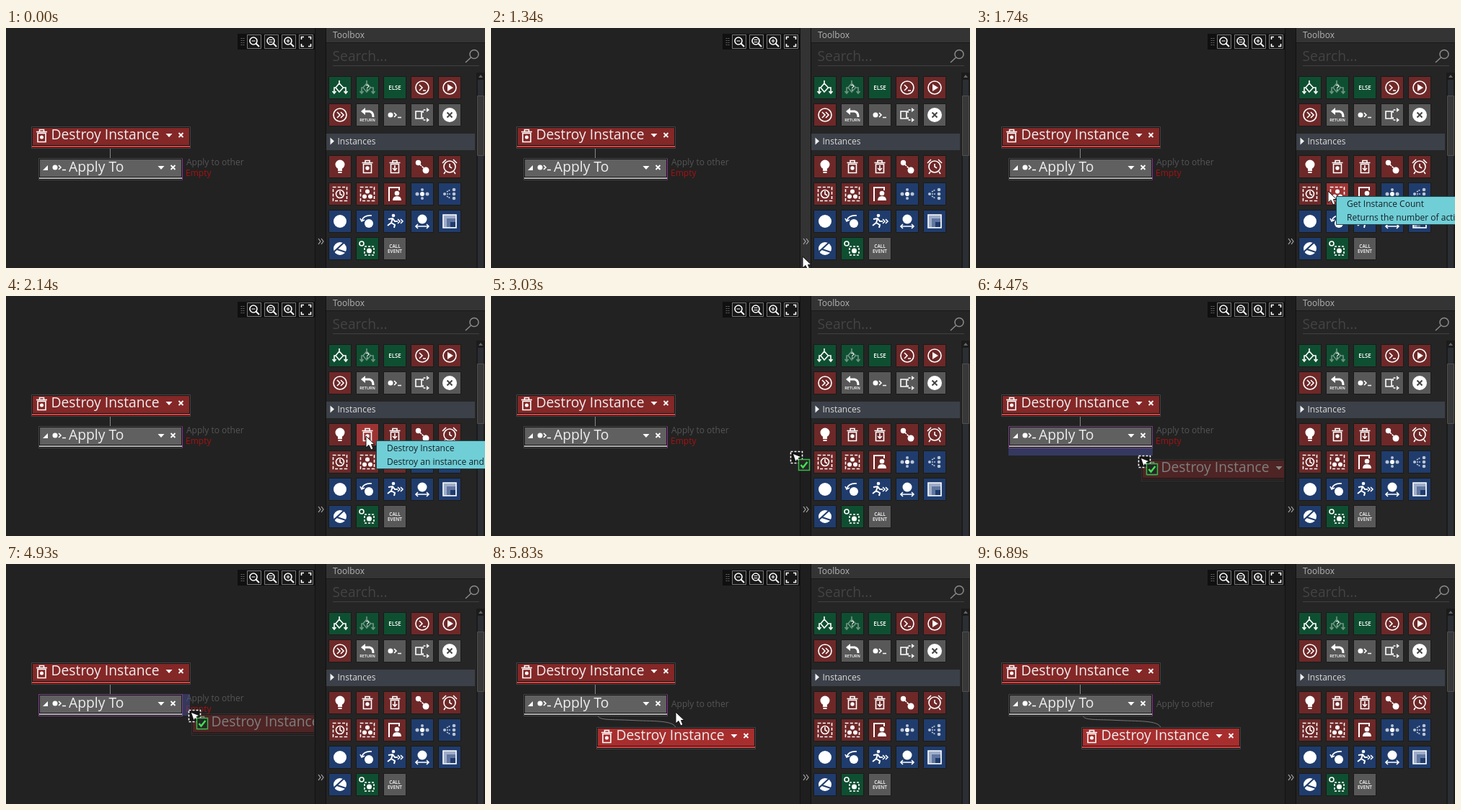
These frames come from a looping animation (664 by 334 pixels, 8.54 s). An HTML page:

```html
<!DOCTYPE html>
<html lang="en">
<head>
<meta charset="utf-8">
<title>Dragging an action onto a block</title>
<style>
html, body { margin: 0; width: 100%; height: 100%; overflow: hidden; background: #222; }
svg { display: block; width: 664px; height: 334px; }
text { font: 12px "Open Sans", "Noto Sans", sans-serif; stroke: none; }
.big { font-size: 19.3px; }
.line { fill: none; stroke: #fff; stroke-width: 1.6; }
.solid { fill: #fff; stroke: none; }
.tiny { fill: #fff; font-weight: 600; text-anchor: middle; }
</style>
</head>
<body>
<svg viewBox="0 0 664 334">
  <defs>
    <clipPath id="canvasArea"><path d="M0 0H427V334H0Z"/></clipPath>
    <g id="trash" class="line">
      <path d="M-7.500-5.500H7.500M-3-6V-8.500H3V-6M-5.500-3.500V8.500H5.500V-3.500Z"/>
    </g>
    <g id="prompt" class="line">
      <circle class="solid" cx="-6" r="3.500"/><path d="M-1-3L2 0L-1 3M4 3.500H9"/>
    </g>
    <g id="menu">
      <path d="M-21-2H-12L-16.500 3Z" fill="#fff"/>
      <path d="M-3-3L3 3M3-3L-3 3" fill="none" stroke="#fff" stroke-width="1.800"/>
    </g>
    <g id="destroy">
      <path d="M.5.5H220.500V30.500H.5Z" fill="#161616" stroke="#444"/>
      <path d="M2 2H219V26H2Z" fill="currentColor"/>
      <path d="M1 28H220" stroke="var(--rule, #dc4040)" stroke-width="2"/>
      <use href="#trash" x="14.500" y="13"/><circle cx="14.500" cy="15" r="2.500" fill="#fff"/>
      <text class="big" x="27.500" y="18" fill="#eee">Destroy Instance</text>
      <use href="#menu" x="207.500" y="12"/>
    </g>
    <g id="lens" class="line">
      <path d="M-9.500-9.500H9.500V9.500H-9.500Z" style="fill:#181818;stroke:#777;stroke-width:1"/>
      <circle cx="-1" cy="-1" r="5"/><path d="M2.500 2.500L7 7" stroke-width="2"/>
    </g>
  </defs>

  <path d="M0 0H664V334H0Z" fill="#222"/>

  <!-- Zoom bar -->
  <path d="M321 8H428V30H321Z" fill="#101010"/>
  <path d="M326.500 14V25M329.500 14V25" stroke="#666" stroke-width="2" stroke-dasharray="1 2"/>
  <use href="#lens" x="344" y="19"/><use href="#lens" x="368" y="19"/><use href="#lens" x="392" y="19"/>
  <path class="line" style="stroke-width:1.200" d="M340.500 18H345.500M364.500 16.500H369.500M364.500 19.500H369.500M388.500 18H393.500M391 15.500V20.500"/>
  <path d="M406.500 9.500H425.500V28.500H406.500Z" fill="#181818" stroke="#777"/>
  <path class="line" d="M409.500 16V12.500H413M419 12.500H422.500V16M422.500 22V25.500H419M413 25.500H409.500V22"/>

  <!-- Blocks -->
  <path d="M144.500 168V181" stroke="#888"/>
  <use href="#destroy" x="35" y="137" color="#842727"/>
  <path id="wire" d="M148 211C150 218 168 216 195 217.500S254 217 256 228" fill="none" stroke="#777"/>
  <g transform="translate(45 181)">
    <path d="M.5.5H199.500V30.500H.5Z" fill="#161616" stroke="#444"/>
    <path d="M2 2H198V26H2Z" fill="#606060"/>
    <path d="M1 28H199" stroke="#b0b0b0" stroke-width="2"/>
    <path d="M199.500 1V30" stroke="#93309a"/>
    <path id="outline" d="M.5.5H199.500V30.500H.5Z" fill="none" stroke="#7a4288"/>
    <path d="M6 17H13V10Z" fill="#fff"/>
    <use href="#prompt" x="29" y="13"/>
    <text class="big" x="42" y="19" fill="#eee">Apply To</text>
    <use href="#menu" x="186.500" y="13"/>
  </g>
  <text id="note" x="250" fill="#555">Apply to other</text>
  <text id="empty" x="249" y="206" fill="#a51212">Empty</text>
  <path id="below" d="M45 212H245V222H45Z" fill="#35395f"/>
  <path id="beside" d="M245 181H255V211H245Z" fill="#484e90" opacity=".5"/>
  <use id="dropped" href="#destroy" x="146" y="227" color="#a82e2e"/>
  <g clip-path="url(#canvasArea)"><use id="ghost" href="#destroy" color="#842727" style="--rule:#4a2626"/></g>

  <!-- Toolbox -->
  <path d="M429 0H444V334H429Z" fill="#1e1e1e"/>
  <path id="splitter" d="M429 0H443V334H429Z" fill="#333"/>
  <path d="M428.500 0V334M443.500 0V334" stroke="#111"/>
  <path d="M433 293L436 297L433 301M437 293L440 297L437 301" fill="none" stroke="#aaa" stroke-width="1.200"/>
  <path d="M444 0H664V334H444Z" fill="#252525"/>
  <path d="M444 0H664V20H444Z" fill="#343434"/><path d="M444 20.500H664" stroke="#181818"/>
  <text x="453" y="13.500" fill="#b4b4b4">Toolbox</text>
  <text class="big" x="452.500" y="45.500" fill="#434343">Search...</text>
  <path d="M453 52.500H656" stroke="#404040"/>
  <g fill="none" stroke="#8a8a8a" stroke-width="1.500"><circle cx="649" cy="36.500" r="6"/><path d="M644.500 41L637 48"/></g>
  <path d="M444 147H650V170H444Z" fill="#3c4048"/>
  <path d="M449.500 152.500V162.500L455 157.500Z" fill="#eee"/>
  <text x="459.500" y="162" fill="#ddd">Instances</text>
  <path d="M652 62H664V334H652Z" fill="#1b1b1b"/>
  <path d="M654 72H662V334H654Z" fill="#2b2e33"/>
  <path d="M655 69L658 65L661 69Z" fill="#666"/>
  <path d="M653.500 94.500H662.500V177.500H653.500Z" fill="#383838" stroke="#505050"/>
  <g id="buttons"></g>

  <!-- Pointer layer -->
  <g id="tooltip">
    <path d="M.5.5H240V39.500H.5Z" fill="#70ced7" stroke="#23474b"/>
    <text id="title" x="15" y="14.500" fill="#152023"></text>
    <text id="detail" x="15" y="33.500" fill="#152023"></text>
  </g>
  <path id="arrow" d="M0 0V16L4 12.500L7 19L10 17.500L7.500 11.500H12Z" fill="#fff" stroke="#111"/>
  <g id="drag">
    <path d="M0 0H17V17H0Z" fill="#161616"/>
    <path class="line" stroke-dasharray="3 2" d="M.5.5H16.500V16.500H.5Z"/>
    <path class="solid" d="M4 4L14 8L10.500 9.500L14 13L12.500 14.500L9 11L7.500 14Z"/>
    <path d="M11.500 11.500H26.500V26.500H11.500Z" fill="#262626" stroke="#3cb84a" stroke-width="1.500"/>
    <path d="M14.500 19L17.500 22.500L23.500 15" fill="none" stroke="#42e052" stroke-width="2.500"/>
  </g>
</svg>

<script>
const $ = id => document.getElementById(id);
const RED = '#6e2828', GREEN = '#0f4f31', GREY = '#585858', BLUE = '#1f3c6d';
const HOVER = { [RED]: '#9c3434', [GREEN]: '#1b7048', [GREY]: '#777', [BLUE]: '#2f5596' };

const line = (d, extra = '') => `<path d="${d}" ${extra}/>`;
const solid = d => line(d, 'class="solid"');
const ring = (x, y, r) => `<circle cx="${x}" cy="${y}" r="${r}"/>`;
const dot = (x, y, r) => `<circle class="solid" cx="${x}" cy="${y}" r="${r}"/>`;
const label = (s, y, size) => `<text class="tiny" y="${y}" style="font-size:${size}px">${s}</text>`;
const use = id => `<use href="#${id}"/>`;
const dim = (icon, opacity) => `<g opacity="${opacity}">${icon}</g>`;

const branch = line('M-1-10V-6L4.500 0L-1 6L-6 0L-1-6M-6 0H-8V7M4.500 0H8V7M-10.500 5L-8 8L-5.500 5M5.500 5L8 8L10.500 5');
const frame = line('M-9.500-9.500H9.500V9.500H-9.500Z', 'stroke-dasharray="4 2.300"');
const clock = r => ring(0, 0, r) + line('M0-4V0L3 2');

// Each row starts at its own y; every button is a colour and an icon.
const rows = [
  [67, [GREEN, branch],
       [GREEN, dim(branch, .4) + label('?', 4, 10)],
       [GREEN, label('ELSE', 3, 8)],
       [RED, ring(0, 0, 9) + line('M-4-4L0 0L-4 4M1 4H5')],
       [RED, ring(0, 0, 9) + solid('M-3-5V5L5 0Z')]],
  [105, [RED, ring(0, 0, 9) + line('M-4-4L0 0L-4 4M1-4L5 0L1 4')],
        [GREY, line('M-5-5H3Q8-4 8 3', 'stroke-width="3"') + solid('M-9-5L-3-10V0Z') + label('RETURN', 9, 5.5)],
        [GREY, use('prompt')],
        [GREY, line('M-9-5H-1V5H-9Z') + line('M1-3V-7H8M1 3V7H8', 'stroke-dasharray="3 1.5"') + solid('M6-10L10-7L6-4ZM6 4L10 7L6 10Z')],
        [GREY, dot(0, 0, 10) + line('M-3.500-3.500L3.500 3.500M3.500-3.500L-3.500 3.500', 'style="stroke:#444;stroke-width:2"')]],
  [177, [RED, dot(0, -3, 6.5) + solid('M-3 2H3V6H-3ZM-2.500 7H2.500V9H-2.500Z')],
        [RED, use('trash') + dot(0, 2, 2.7)],
        [RED, use('trash') + line('M0-2V5M-3 2L0 5L3 2')],
        [RED, line('M-6-6L6 6', 'stroke-dasharray="3 1"') + dot(-5.5, -5.5, 3.7) + dot(5, 5, 4.5)],
        [RED, clock(8) + line('M-10-5L-5-10M10-5L5-10M-6 7L-8 10M6 7L8 10')]],
  [215, [RED, frame + clock(5.5)],
        [RED, frame + dot(0, -3.5, 3) + dot(-4, 3.5, 3) + dot(4, 3.5, 3)],
        [RED, line('M-8 10V-9H6V-5', 'stroke-width="2"') + dot(3, -1, 3.3) + solid('M-3 9Q-3 3 3 3T9 9Z')],
        [BLUE, dot(0, 0, 3) + dim(dot(-7, 0, 2.5) + dot(7, 0, 2.5) + dot(0, -6, 2) + dot(0, 6, 2), .7)],
        [BLUE, dim(dot(-7, 0, 2) + dot(6, -6, 2.3) + dot(6, 0, 2.3) + dot(6, 6, 2.3) + line('M-4 0H2M-4-3L1-6M-4 3L1 6', 'stroke-dasharray="2 1"'), .7)]],
  [253, [BLUE, dot(0, 0, 9)],
        [BLUE, dot(2, 3, 6) + line('M-8-1Q-5-9 6-8M-10-4L-8 0L-4-2')],
        [BLUE, dot(-2, -8, 2.3) + line('M-9-3L-3-4L0 0L4 0M-3-4L-5 2L0 5L-1 9M-5 2L-10 6', 'stroke-width="2"') + line('M4-3L7 0L4 3M8-3L11 0L8 3')],
        [BLUE, dot(0, -3, 6.5) + line('M-9 7H9M-6 4L-9 7L-6 10M6 4L9 7L6 10')],
        [BLUE, line('M-9-9H9V9H-9Z', 'style="fill:#9eacc8"') + line('M-4-4H8V8H-4Z', 'style="fill:#6076a0;stroke:none"') + line('M1 1H8V8H1Z', `style="fill:${BLUE};stroke:none"`)]],
  [291, [BLUE, dot(0, 0, 9) + line('M-9 5L5-8M-4 1L8 5', `style="stroke:${BLUE};stroke-width:2"`)],
        [GREEN, ring(-8, -7, 3) + line('M-4-3H9V9H-4Z', 'stroke-dasharray="3 2"') + dot(2.5, 3, 3.5)],
        [GREY, label('CALL', -1, 6.5) + label('EVENT', 6, 6.5)]]
];

const buttons = rows.flatMap(([y, ...cells]) => cells.map(([color, icon], i) => ({ x: 447 + 38 * i, y, color, icon })));
$('buttons').innerHTML = buttons.map(b => `<g class="line" transform="translate(${b.x + 16} ${b.y + 16})">
  <path d="M-15.500-15.500H15.500V15.500H-15.500Z" style="fill:${b.color};stroke:#1a1a1a;stroke-width:1"/>${b.icon}</g>`).join('');
buttons.forEach((b, i) => b.face = $('buttons').children[i].firstElementChild);

const tips = {
  '485,215': ['Get Instance Count', 'Returns the number of active instances'],
  '485,177': ['Destroy Instance', 'Destroy an instance and run its event']
};

// Pointer path: time, x, y
const path = [
  [1280, 432, 318], [1590, 478, 240], [1660, 485, 228], [1740, 488, 227], [1980, 491, 199], [2060, 499, 195],
  [2670, 499, 195], [3030, 418, 220], [3190, 340, 240], [3440, 214, 226], [4110, 214, 226], [4470, 228, 226],
  [4930, 256, 207], [5830, 256, 206], [6490, 256, 206], [6890, 267, 336]
];
const LOOP = 8540, TICK = 77.5;
const GRAB = 2670, DROP = 5830, LEAVE = 6890;

// The pointer advances in ticks, restarted at each point of the path.
function pointerAt(t) {
  const i = path.findIndex(p => p[0] > t);
  if (i < 1) return path[i ? path.length - 1 : 0].slice(1);
  const [t0, x0, y0] = path[i - 1], [t1, x1, y1] = path[i];
  if (t1 === DROP) return [x0, y0];
  const steps = Math.max(1, Math.round((t1 - t0) / TICK));
  const u = Math.floor((t - t0) / (t1 - t0) * steps) / steps;
  return [x0 + (x1 - x0) * u, y0 + (y1 - y0) * u].map(Math.round);
}

const show = (id, on) => $(id).style.display = on ? '' : 'none';
const move = (id, x, y) => $(id).setAttribute('transform', `translate(${x} ${y})`);

function draw(t) {
  const [x, y] = pointerAt(t);
  const browsing = t >= 1280 && t < GRAB, dragging = t >= GRAB && t < DROP, done = t >= DROP;

  show('arrow', browsing || (done && t < LEAVE));
  move('arrow', x, y);
  show('splitter', browsing && x < 443);

  let hovered = null;
  for (const b of buttons) {
    const over = browsing && x >= b.x && x < b.x + 32 && y >= b.y && y < b.y + 32;
    if (over) hovered = b;
    b.face.style.fill = over ? HOVER[b.color] : b.color;
  }
  const tip = hovered && tips[`${hovered.x},${hovered.y}`];
  show('tooltip', tip);
  if (tip) {
    const [tx, ty] = pointerAt(t - 78);
    move('tooltip', tx + 14, ty + 6);
    $('title').textContent = tip[0];
    $('detail').textContent = tip[1];
  }

  const aiming = dragging && x < 260;
  show('drag', dragging);
  move('drag', x - 3, y - 4);
  show('ghost', dragging && x < 400);
  move('ghost', x + 1, y + 1);
  const fade = Math.floor((t - 3100) / TICK) * TICK / 620;
  $('ghost').style.opacity = .45 * Math.min(1, Math.max(0, fade));
  show('outline', aiming);
  show('below', aiming && y >= 216);
  show('beside', aiming && y < 216);

  show('wire', done);
  show('dropped', done);
  show('empty', !done);
  $('note').setAttribute('y', done ? 199 : 191);
}

function loop() {
  draw(performance.now() % LOOP);
  requestAnimationFrame(loop);
}
loop();
</script>
</body>
</html>
```
